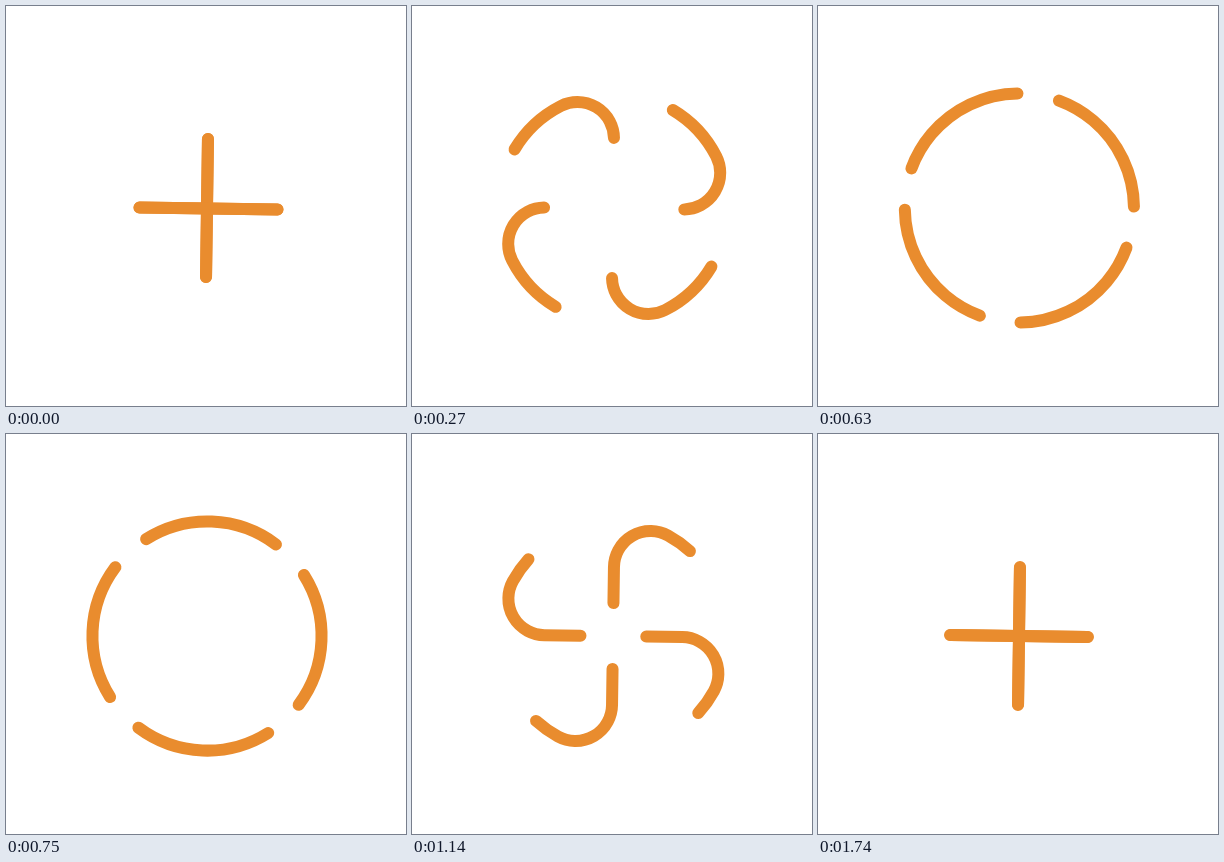
Recreate the animation shown at these times as an HTML page. Size 400x400 px, loop 3.86 s.

```html
<!DOCTYPE html>
<html lang="en">
<head>
<meta charset="utf-8">
<title>Plus and ring</title>
<style>
  html, body { margin: 0; width: 100%; height: 100%; overflow: hidden; background: #fff; }
  svg { display: block; width: 100%; height: 100%; }
  path { fill: none; stroke: #e98c2e; stroke-width: 12; stroke-linecap: round; }
</style>
</head>
<body>
<svg viewBox="0 0 400 400"><g id="arms" transform="translate(201 202) rotate(0.8)"></g></svg>
<script>
const LOOP = 3860, STEP = 30;
const HALF = 69;      // half the length of a bar
const BEND = 36.5;    // radius of the turn between bar and ring
const reach = Math.hypot(HALF, BEND);
const RING = reach + BEND;
const tx = BEND * RING / reach, ty = HALF * RING / reach;

// Up the bar, around the ring, and back down the bar.
const track = `M0 ${HALF}V${-HALF}` +
  `A${BEND} ${BEND} 0 0 0 ${-tx} ${-ty}` +
  `A${RING} ${RING} 0 1 0 ${tx} ${-ty}` +
  `A${BEND} ${BEND} 0 0 0 0 ${-HALF}V${HALF}`;

const group = document.getElementById('arms');
const arms = [0, 90, 180, 270].map(angle => {
  const path = document.createElementNS('http://www.w3.org/2000/svg', 'path');
  path.setAttribute('d', track);
  path.setAttribute('stroke-dasharray', `${2 * HALF} 4000`);
  group.append(path);
  return { path, angle };
});

const END = arms[0].path.getTotalLength() - 2 * HALF;

// time, distance along the track, sideways drift of the horizontal bar
const KEYS = [
  [0, 0, 1.5],
  [945, 702, 0],
  [1350, END, 0.8],
  [1740, END, 0]
];

function pose(t) {
  const i = KEYS.findIndex(key => key[0] > t);
  if (i < 0) return KEYS[KEYS.length - 1];
  const a = KEYS[i - 1], b = KEYS[i];
  const u = (t - a[0]) / (b[0] - a[0]);
  const eased = u * u * (3 - 2 * u);
  return a.map((v, n) => v + (b[n] - v) * eased);
}

function draw(t) {
  const [, distance, drift] = pose(Math.floor(t / STEP) * STEP);
  for (const { path, angle } of arms) {
    const dx = angle % 180 ? drift : 0;
    path.setAttribute('stroke-dashoffset', -distance);
    path.setAttribute('transform', `translate(${dx} ${dx / 3}) rotate(${angle})`);
  }
}

const start = performance.now();
function tick() {
  draw((performance.now() - start) % LOOP);
  requestAnimationFrame(tick);
}
draw(0);
requestAnimationFrame(tick);
</script>
</body>
</html>
```
